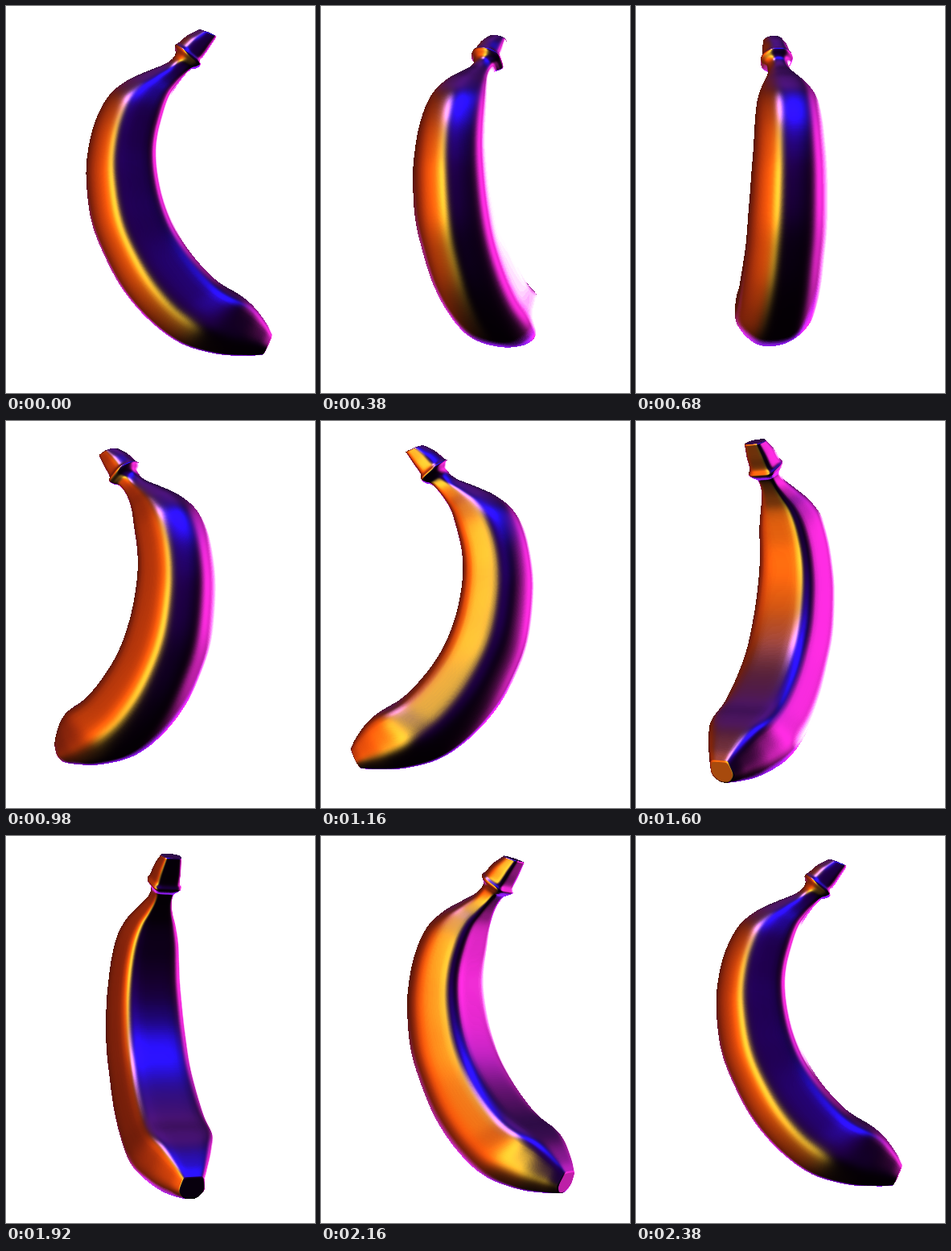
Write an HTML page with a canvas that moves like this. It is 384 px wide and 480 px high and loops after 2400 ms.

```html
<!DOCTYPE html>
<html lang="en">
<head>
<meta charset="utf-8">
<title>Spinning banana</title>
<style>
html, body { margin: 0; height: 100%; overflow: hidden; background: #fff; }
canvas { display: block; }
</style>
</head>
<body>
<canvas id="stage" width="384" height="480"></canvas>
<script>
const W = 384, H = 480, LOOP = 2400, STEP = 20;
const AXIS_X = 183, MID_Y = 240, CAMERA = 1500;
const SIDES = 48, STEPS = 6;

// Side profile, stem to tip: outer x, y, inner x, y
const PROFILE = [
  [239, 29, 261, 38], [225, 36, 251, 53], [214, 45, 242, 66], [209, 49, 241, 73],
  [210, 58, 236, 76], [206, 65, 229, 78], [196, 72, 220, 87], [176, 80, 211, 99],
  [150, 92, 203, 113], [127, 111, 196, 135], [110, 143, 190, 160], [101, 180, 188, 185],
  [99, 215, 191, 215], [105, 265, 199, 248], [121, 308, 213, 281], [145, 352, 234, 312],
  [178, 390, 262, 341], [217, 418, 291, 359], [262, 431, 308, 373], [300, 433, 323, 393],
  [318, 432, 330, 406]
];

const clamp = (v, lo, hi) => Math.max(lo, Math.min(hi, v));
const smooth = (lo, hi, v) => {
  const t = clamp((v - lo) / (hi - lo), 0, 1);
  return t * t * (3 - 2 * t);
};
const spline = (a, b, c, d, t) =>
  b + 0.5 * t * (c - a + t * (2 * a - 5 * b + 4 * c - d + t * (3 * (b - c) + d - a)));

// Rounded polygon cross-section; angle 0 points to the inner curve
const FACES = [0, 78, -78, 130, -130, 180].map(d => d * Math.PI / 180);
const radius = angle => FACES.reduce(
  (sum, f) => sum + Math.max(0, Math.cos(angle - f)) ** 8, 0) ** -0.125;

function ring([ox, oy, ix, iy], scale) {
  const cx = (ox + ix) / 2 - AXIS_X, cy = (oy + iy) / 2 - MID_Y;
  const hx = (ix - ox) / 2, hy = (iy - oy) / 2, depth = Math.hypot(hx, hy) * 1.04;
  return Array.from({ length: SIDES }, (_, j) => {
    const angle = j / SIDES * 2 * Math.PI, r = radius(angle) * scale;
    const c = r * Math.cos(angle);
    return [cx + hx * c, cy + hy * c, depth * r * Math.sin(angle)];
  });
}

function buildRings() {
  const last = PROFILE.length - 1, at = i => PROFILE[clamp(i, 0, last)];
  const rings = [ring(at(0), 0.01), ring(at(0), 0.85)];
  for (let k = 0; k <= last * STEPS; k++) {
    const i = Math.floor(k / STEPS), t = k / STEPS - i;
    rings.push(ring(at(i).map((v, n) => spline(at(i - 1)[n], v, at(i + 1)[n], at(i + 2)[n], t)), 1));
  }
  rings.push(ring(at(last), 0.88), ring(at(last), 0.01));
  return rings;
}

const rings = buildRings();
const vertices = rings.flatMap((points, i) => points.map((p, j) => {
  const before = rings[Math.max(0, i - 1)][j];
  const after = rings[Math.min(rings.length - 1, i + 1)][j];
  const left = points[(j + SIDES - 1) % SIDES], right = points[(j + 1) % SIDES];
  const [ux, uy, uz] = after.map((v, n) => v - before[n]);
  const [vx, vy, vz] = right.map((v, n) => v - left[n]);
  const n = [uy * vz - uz * vy, uz * vx - ux * vz, ux * vy - uy * vx];
  const len = Math.hypot(...n) || 1;
  return { p, n: n.map(v => v / len) };
}));

// Studio lights by view-space normal: centre x, y, spread x, y, colour
const LIGHTS = [
  [-0.75, 0, 0.35, 0.9, [130, 35, 8]],
  [-0.5, -0.05, 0.2, 0.5, [150, 60, 0]],
  [-0.28, -0.05, 0.16, 0.42, [210, 190, 40]],
  [-0.25, 0.42, 0.15, 0.14, [180, 110, 220]],
  [0.18, 0.42, 0.36, 0.2, [30, 20, 255]],
  [0.1, 0.1, 0.3, 0.4, [28, 0, 70]],
  [0, 0.8, 0.6, 0.2, [70, 20, 110]],
  [0.75, 0, 0.2, 0.75, [255, 45, 225]]
];

function shade(x, y) {
  const color = [4, 0, 4];
  const add = (rgb, amount) => rgb.forEach((v, n) => color[n] += v * amount);
  for (const [cx, cy, sx, sy, rgb] of LIGHTS)
    add(rgb, Math.exp(-(((x - cx) / sx) ** 2) - ((y - cy) / sy) ** 2));
  const edge = smooth(0.88, 1, Math.hypot(x, y));
  add([150, 30, 255], edge * clamp(-y * 1.5, 0, 1));
  add([255, 255, 255], smooth(0.8, 0.95, x));
  const [r, g, b] = color.map(v => clamp(v, 0, 255));
  return (255 << 24 | b << 16 | g << 8 | r) >>> 0;
}

const sphere = new Uint32Array(256 * 256);
for (let i = 0; i < sphere.length; i++)
  sphere[i] = shade((i & 255) / 127.5 - 1, 1 - (i >> 8) / 127.5);

const ctx = document.getElementById("stage").getContext("2d");
const image = ctx.createImageData(W, H);
const pixels = new Uint32Array(image.data.buffer);
const depths = new Float32Array(W * H);

function triangle(a, b, c) {
  const area = (b.x - a.x) * (c.y - a.y) - (b.y - a.y) * (c.x - a.x);
  if (Math.abs(area) < 1e-6) return;
  const x0 = Math.max(0, Math.ceil(Math.min(a.x, b.x, c.x)));
  const x1 = Math.min(W - 1, Math.floor(Math.max(a.x, b.x, c.x)));
  const y0 = Math.max(0, Math.ceil(Math.min(a.y, b.y, c.y)));
  const y1 = Math.min(H - 1, Math.floor(Math.max(a.y, b.y, c.y)));
  for (let y = y0; y <= y1; y++) for (let x = x0; x <= x1; x++) {
    const u = ((b.x - x) * (c.y - y) - (b.y - y) * (c.x - x)) / area;
    const v = ((c.x - x) * (a.y - y) - (c.y - y) * (a.x - x)) / area;
    const w = 1 - u - v;
    if (u < -1e-6 || v < -1e-6 || w < -1e-6) continue;
    const z = u * a.z + v * b.z + w * c.z, i = y * W + x;
    if (z <= depths[i]) continue;
    depths[i] = z;
    const nx = clamp(u * a.nx + v * b.nx + w * c.nx, -1, 1);
    const ny = clamp(u * a.ny + v * b.ny + w * c.ny, -1, 1);
    pixels[i] = sphere[Math.round((ny + 1) * 127.5) * 256 + Math.round((nx + 1) * 127.5)];
  }
}

function draw(time) {
  const turn = time / LOOP * 2 * Math.PI, cos = Math.cos(turn), sin = Math.sin(turn);
  const view = vertices.map(({ p, n }) => {
    const z = p[2] * cos - p[0] * sin, k = CAMERA / (CAMERA - z);
    return {
      x: AXIS_X + (p[0] * cos + p[2] * sin) * k, y: MID_Y + p[1] * k, z,
      nx: n[0] * cos + n[2] * sin, ny: n[1]
    };
  });
  pixels.fill(0xffffffff);
  depths.fill(-1e9);
  for (let i = 0; i < rings.length - 1; i++) for (let j = 0; j < SIDES; j++) {
    const a = i * SIDES + j, b = i * SIDES + (j + 1) % SIDES;
    triangle(view[a], view[b], view[a + SIDES]);
    triangle(view[b], view[b + SIDES], view[a + SIDES]);
  }
  ctx.putImageData(image, 0, 0);
}

function frame() {
  draw(Math.floor(performance.now() % LOOP / STEP) * STEP);
  requestAnimationFrame(frame);
}
frame();
</script>
</body>
</html>
```
